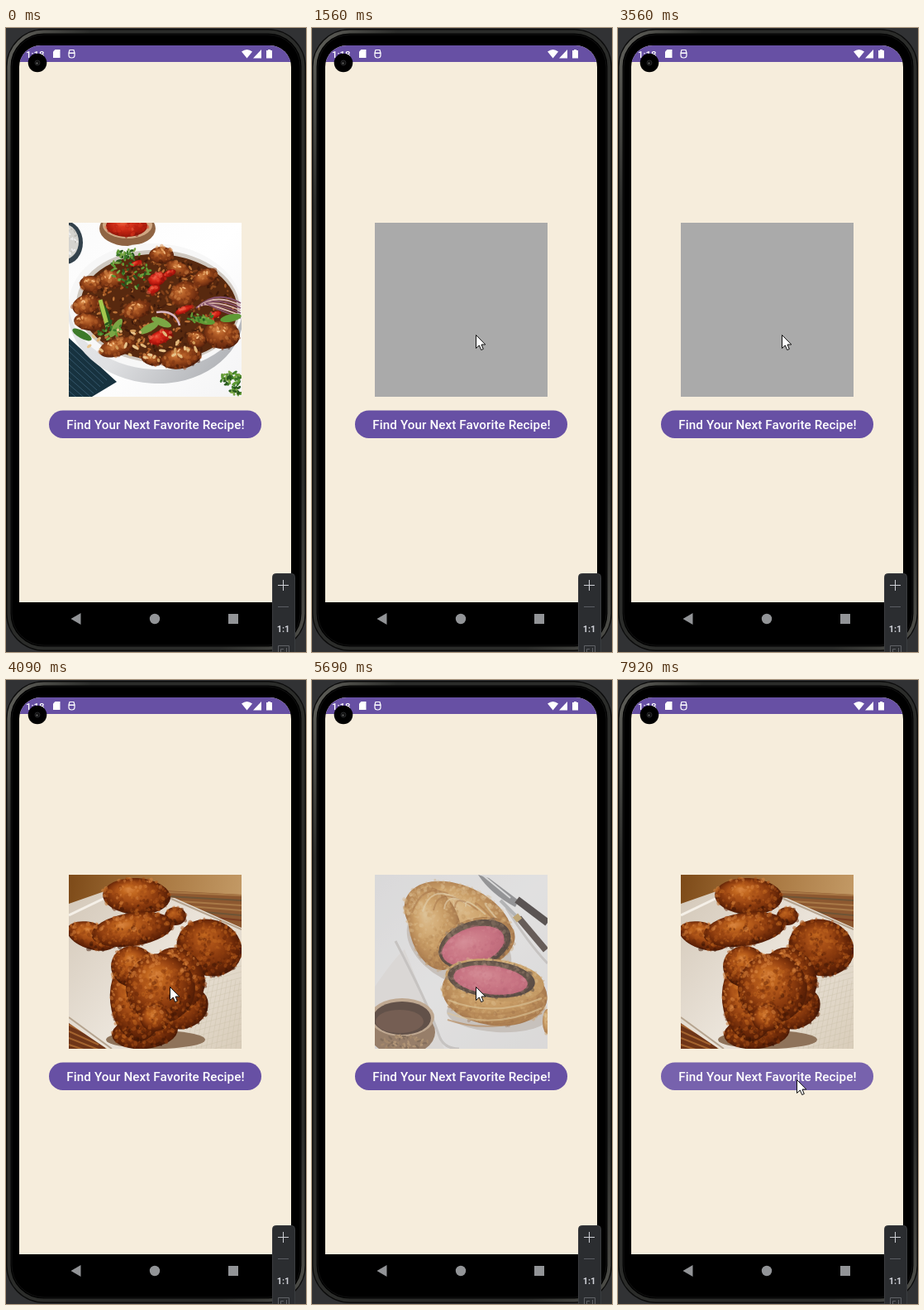
Recreate the animation shown at these times as an HTML page with a canvas. Size 363 by 753 pixels, loop 7.99 s.

```html
<!DOCTYPE html>
<html lang="en">
<head>
<meta charset="utf-8">
<title>Recipe app</title>
<style>
  html, body { margin: 0; width: 100%; height: 100%; overflow: hidden; background: #313234; }
  svg, canvas { position: absolute; left: 0; top: 0; }
  canvas { left: 76px; top: 235px; }
  text { font-family: Roboto, "Open Sans", sans-serif; fill: #fff; }
</style>
</head>
<body>
<svg width="363" height="753">
  <defs>
    <linearGradient id="rim" x2="1" y2="1">
      <stop offset="0" stop-color="#62625c"/><stop offset=".14" stop-color="#2b2c2a"/>
      <stop offset=".86" stop-color="#2b2c2a"/><stop offset="1" stop-color="#50504b"/>
    </linearGradient>
    <clipPath id="pill"><rect x="52" y="461.5" width="257" height="33.5" rx="16.75"/></clipPath>
    <clipPath id="screen"><path d="M16 693V47A26 26 0 0 1 42 21H319A26 26 0 0 1 345 47V693Z"/></clipPath>
  </defs>
  <rect x="0" y="1" width="363" height="751" rx="46" fill="#0b0b0b"/>
  <rect x="3.500" y="4.500" width="356" height="744" rx="42" fill="#000" stroke="url(#rim)" stroke-width="4"/>
  <rect x="7" y="8" width="349" height="737" rx="39" fill="#000" stroke="#111"/>
  <g clip-path="url(#screen)">
    <path d="M16 21H345V693H16Z" fill="#f6eddc"/>
    <path d="M16 21H345V41H16Z" fill="#6750a4"/>
    <text x="24" y="35.5" font-size="11.5" font-weight="500">1:18</text>
  </g>
  <g fill="#fff">
    <path d="M59.500 26H65.500V36H57V28.500Z"/>
    <path d="M285 28.500Q291.500 23.500 298 28.500L291.500 36.500Z"/>
    <path d="M299 36.500H309V26Z"/>
    <path d="M315 27H317V26H320V27H322V36.500H315Z"/>
    <path d="M77 26.500H82L83 30H76ZM76 30.500H83V33Q83 36 79.500 36T76 33Z" fill="none" stroke="#fff" stroke-width="1.2"/>
  </g>
  <circle cx="38" cy="42" r="11.3"/>
  <circle cx="38" cy="42" r="3" fill="#111" stroke="#262729"/>
  <circle cx="37.500" cy="42.500" r="1" fill="#777"/>
  <g fill="#929497">
    <path d="M78.500 713L90.500 706V720Z"/><circle cx="180" cy="713" r="6.2"/><path d="M269 707H281V719H269Z"/>
  </g>
  <g clip-path="url(#pill)">
    <path d="M52 461H309V496H52Z" fill="#6750a4"/>
    <circle id="ripple" cx="217" cy="482" fill="#fff" opacity=".1"/>
  </g>
  <text x="181" y="484" font-size="15.2" font-weight="500" letter-spacing=".1" text-anchor="middle">Find Your Next Favorite Recipe!</text>
  <rect x="322.500" y="658.500" width="27" height="100" rx="4" fill="#2b2d30" stroke="#3a3c3f"/>
  <path d="M329 672.500H342M335.500 666V679" stroke="#ced0d6"/>
  <path d="M329 698.500H342" stroke="#5a5d63"/>
  <text x="335.500" y="729" font-size="11" font-weight="700" text-anchor="middle" style="fill:#ced0d6">1:1</text>
  <path d="M329.500 754V745.500H342.500V754M332.500 754V749.500H336M339.500 748V754" fill="none" stroke="#606266"/>
</svg>
<canvas id="photo" width="209" height="210"></canvas>
<svg width="363" height="753">
  <g id="cursor">
    <circle id="tap" r="12" fill="#ddd" opacity=".5"/>
    <path d="M.5 .5V16.500L4.300 13L6.700 18.500L9.300 17.400L7 12H11.800Z" fill="#fff" stroke="#111" stroke-linejoin="round"/>
  </g>
</svg>
<script>
const $ = id => document.getElementById(id);
const LOOP = 7990, TAU = Math.PI * 2;
let g, seed = 7;

const rand = () => (seed = (seed * 16807) % 2147483647) / 2147483647;
const pick = list => list[Math.floor(rand() * list.length)];

function blob(x, y, rx, ry, color, rot = 0) {
  g.fillStyle = color;
  g.beginPath();
  g.ellipse(x, y, rx, ry, rot, 0, TAU);
  g.fill();
}

function shape(d, color, line) {
  const p = new Path2D(d);
  if (line) { g.strokeStyle = color; g.lineWidth = line; g.stroke(p); }
  else { g.fillStyle = color; g.fill(p); }
}

function blend(f, colors) {
  colors.forEach((c, i) => f.addColorStop(i / (colors.length - 1), c));
  return f;
}

const fade = (x0, y0, x1, y1, ...colors) => blend(g.createLinearGradient(x0, y0, x1, y1), colors);

// Rounded, finely textured lump lit from the upper left; colours run from light to dark.
function lump(x, y, rx, ry, rot, colors, rough = .5) {
  const glow = g.createRadialGradient(-.25, -.4, 0, 0, 0, 1.15), dots = rx * ry / 5;
  blend(glow, colors);
  g.save();
  g.translate(x, y);
  g.rotate(rot);
  g.save();
  g.scale(rx, ry);
  blob(0, 0, 1, 1, glow);
  g.restore();
  g.globalAlpha = rough;
  for (let i = 0; i < dots; i++) {
    const a = rand() * TAU, r = Math.sqrt(rand()) * 1.02, u = Math.cos(a) * r, v = Math.sin(a) * r;
    const shade = .42 + v * .25 + u * .1 + (rand() - .5) * .7;
    const c = colors[Math.max(0, Math.min(colors.length - 1, Math.floor(shade * colors.length)))];
    const s = .8 + rand() * 1.6;
    blob(u * rx, v * ry, s * 1.3, s, c, rand() * 3);
  }
  g.restore();
}

function scatter(n, x, y, rx, ry, size, colors) {
  for (let i = 0; i < n; i++) {
    const a = rand() * TAU, r = Math.sqrt(rand());
    blob(x + Math.cos(a) * r * rx, y + Math.sin(a) * r * ry, size * (.6 + rand()), size * .6, pick(colors), rand() * 3);
  }
}

function photo(draw) {
  const c = document.createElement('canvas');
  c.width = 209; c.height = 210;
  g = c.getContext('2d');
  g.translate(-76, -235);
  draw();
  return c;
}

const greens = ['#5f9a35', '#3d7a29', '#2a5a1e', '#7ba645'];

const stirFry = photo(() => {
  shape('M76 235H285V445H76Z', fade(76, 235, 285, 445, '#fbfbfb', '#fff', '#f4f4f5'));
  blob(72, 259, 21, 26, '#33424c');
  blob(71, 258, 17, 21, '#d5d4cf');
  scatter(40, 77, 258, 9, 17, 1.6, ['#eee', '#bdbcb6']);
  blob(147, 242, 34, 21, '#8f6443');
  blob(147, 238, 30, 16, '#d0a883');
  lump(146, 239, 25, 13, 0, ['#ef6a45', '#d8341c', '#b8200f', '#7f1409']);
  shape('M76 374L134 427L104 445H76Z', '#17323f');
  for (let i = 0; i < 9; i++) shape(`M76 ${382 + i * 8}L${122 - i * 4} ${425 + i * 4}`, '#34566a', 1);
  blob(181, 345, 106, 84, fade(76, 300, 240, 430, '#e9eaec', '#dfe0e2', '#b4b6ba'), .06);
  blob(181, 336, 105, 76, '#f7f7f7', .06);
  blob(184, 336, 99, 68, '#cfc8c0', .06);
  blob(185, 337, 95, 64, '#58290f', .06);
  const meat = ['#d98d4c', '#b8622a', '#96461a', '#733011', '#3c1507'];
  scatter(420, 185, 338, 90, 61, 2.2, ['#a75a25', '#4a200d', '#bd7438', '#7d3d18', '#3c190a', '#8c4a1e']);
  const pieces = [[97, 334, 17, 12], [103, 309, 14, 10], [128, 303, 17, 11], [188, 274, 15, 10], [216, 321, 18, 15],
    [261, 370, 22, 17], [212, 398, 25, 13], [135, 385, 23, 11], [100, 355, 18, 10], [241, 301, 16, 10],
    [158, 340, 17, 11], [208, 291, 16, 9], [176, 400, 13, 7], [231, 376, 12, 10]];
  for (const [x, y, rx, ry] of pieces) {
    lump(x, y, rx, ry, rand() - .5, meat);
    scatter(4, x - rx * .2, y - ry * .4, rx * .5, ry * .3, 1.6, ['#f3bd83', '#e5a263']);
  }
  for (let i = 0; i < 7; i++) shape(`M${230 + i * 2} ${338 - i}Q254 ${315 + i * 4} 284 ${332 + i * 3}`, i % 2 ? '#d8b4ae' : '#85506b', 1.800);
  shape('M182 343Q205 340 210 359', '#d9b9c6', 2.500);
  for (const [x, y, r] of [[120, 345, 1.2], [133, 362, -1], [173, 362, -.5], [188, 355, .4], [240, 353, .2], [272, 350, -.2], [92, 370, .5]])
    blob(x, y, 13, 4.500, pick(greens), r);
  shape('M114 328L123 361', '#a5c84e', 5);
  const red = ['#f1684c', '#db2c1c', '#b5170e', '#7e0d08'];
  for (const [x, y, rx, ry] of [[183, 303, 11, 8], [179, 315, 8, 5], [198, 296, 8, 4], [187, 373, 15, 8], [215, 340, 11, 4], [253, 346, 8, 4], [157, 284, 8, 3]])
    lump(x, y, rx, ry, -.4, red);
  scatter(55, 151, 292, 26, 22, 2.2, greens);
  scatter(25, 148, 272, 14, 6, 2.2, greens);
  scatter(22, 128, 366, 17, 11, 2.4, greens);
  scatter(18, 238, 350, 18, 6, 2.2, greens);
  scatter(32, 165, 380, 70, 22, 2.8, ['#e2b87c', '#d19a58', '#e8c48c']);
  scatter(50, 273, 423, 14, 8, 2.4, greens);
  scatter(20, 278, 438, 7, 6, 2.4, greens);
});

const souffle = photo(() => {
  shape('M76 235H285V445H76Z', fade(76, 235, 285, 445, '#cfd1d5', '#dfe0e2', '#e8e8e8'));
  shape('M76 235H138L128 300H76Z', fade(76, 0, 138, 0, '#e4e4e5', '#c9cbcf'));
  shape('M76 249Q110 253 134 246', '#f4f4f4', 3);
  shape('M76 303Q110 300 125 306V324L76 326Z', '#b9bcc0');
  shape('M228 235H285V322H244Z', fade(228, 0, 285, 0, '#f5f3ee', '#d6d5d2'));
  for (let i = 0; i < 7; i++) shape(`M${236 + i * 8} 235L${241 + i * 7} ${280 + i % 3 * 8}`, i % 2 ? '#fff' : '#c8cacb', 3);
  for (let i = 0; i < 12; i++) {
    g.strokeStyle = i % 2 ? '#fafafa' : '#b8b9ba'; g.lineWidth = 3;
    g.beginPath(); g.arc(82 + i % 3 * 14, 328 + i * 10, 10, i, i + 4.5); g.stroke();
  }
  blob(181, 393, 106, 48, '#a5a8ac');
  blob(181, 388, 106, 48, '#f0f0f0');
  blob(181, 386, 101, 43, '#d5d7da');
  blob(181, 391, 81, 35, '#f3f3f3');
  blob(184, 398, 70, 30, '#b9bcc0');
  shape('M247 330Q285 344 274 377Q264 395 281 410L276 445', '#d28a6a', 2);
  shape('M106 315L118 400Q124 419 180 419Q232 419 239 400L251 325Z', fade(106, 0, 251, 0, '#d0d1d3', '#eeeeed', '#e6e6e5', '#c5c8ca'));
  for (let i = 0; i < 6; i++) shape(`M${111 + i * 2} ${347 + i * 9}Q180 ${364 + i * 9} ${247 - i * 1.500} ${347 + i * 9}`, '#d3d4d5', 1);
  const crust = ['#ffe9ae', '#ffdb8b', '#f9c567', '#eda744', '#d3842c'];
  lump(187, 263, 46, 16, .05, crust, .3);
  lump(182, 312, 67, 27, 0, ['#fff0b5', '#ffe18b', '#fbcf68', '#efb249', '#dc9135'], .3);
  lump(140, 297, 41, 28, .15, crust, .3);
  lump(216, 292, 43, 28, .2, crust, .3);
  lump(208, 325, 36, 14, -.1, crust, .3);
  shape('M167 270Q171 286 183 301Q184 320 174 331', '#ffe77c', 6);
  shape('M183 291Q178 313 176 330', '#d99b3c', 2);
});

const fried = photo(() => {
  shape('M76 235H285V445H76Z', fade(76, 235, 285, 270, '#7d4a18', '#a87740', '#c39a66'));
  shape('M190 254L285 259V300L190 275Z', '#8d5830');
  for (let i = 0; i < 6; i++) shape(`M195 ${256 + i * 5}L285 ${260 + i * 6}`, pick(['#7b3d22', '#a87846', '#6e5436']), 2);
  shape('M76 410H120V445H76Z', '#6e3518');
  for (let i = 0; i < 5; i++) shape(`M76 ${416 + i * 8}L112 ${434 + i * 6}`, '#a5642f', 2);
  shape('M76 270L122 254L204 263L285 299V445H122L76 414Z', fade(76, 270, 285, 445, '#d5cabb', '#ebe4da', '#d9cdba'));
  shape('M76 407L128 445M200 264L285 301', '#b6a48f', 2);
  shape('M76 284L128 259', '#f5f0e8', 3);
  for (let i = 0; i < 14; i++) shape(`M${238 + i * 5} ${354 + i}L${218 + i * 6} 445M230 ${360 + i * 7}L285 ${345 + i * 7}`, '#c9bda966', 1);
  const crisp = ['#d98540', '#c2671f', '#aa5117', '#8b3b0e', '#652507', '#3c1404'];
  const dark = crisp.slice(1);
  blob(181, 434, 60, 11, '#8f735a');
  lump(205, 285, 13, 11, 0, dark);
  lump(158, 261, 41, 22, .05, crisp);
  lump(246, 323, 40, 34, .3, dark);
  lump(104, 309, 31, 16, .3, crisp);
  lump(153, 301, 50, 20, -.15, crisp);
  lump(168, 425, 40, 20, -.1, dark);
  lump(216, 396, 30, 24, -.5, dark);
  lump(158, 386, 32, 50, -.1, crisp);
  lump(154, 346, 27, 25, .2, crisp);
  lump(207, 360, 33, 38, -.4, crisp);
  lump(187, 372, 42, 42, .1, crisp);
  lump(180, 408, 18, 16, 0, crisp);
});

const wellington = photo(() => {
  shape('M76 235H285V445H76Z', fade(76, 235, 285, 445, '#f0eff0', '#fbfafa', '#f1efee'));
  shape('M76 370Q100 335 112 325L160 445H76Z', '#f1edea');
  shape('M101 315Q140 390 153 427Q158 445 178 445M235 275Q262 318 285 342', '#d4cfcc', 3);
  shape('M201 235L214 239L250 266L246 274Q216 258 201 235Z', '#8a8b8e');
  shape('M206 235L240 263', '#efeff0', 2);
  shape('M248 265L285 293', '#352d2b', 9);
  shape('M228 266L252 290', '#b8b9bb', 4);
  shape('M250 287L283 326', '#493a34', 8);
  shape('M246 284L251 290', '#c9a55e', 8);
  const pastry = ['#f5cf90', '#ebb468', '#d99a4a', '#bd7a32', '#925019'];
  blob(178, 321, 68, 44, '#d5ccc5', .5);
  lump(177, 291, 69, 43, .42, pastry, .35);
  lump(149, 300, 31, 51, -.25, pastry, .35);
  for (let i = 0; i < 8; i++) shape(`M${121 + i * 13} ${281 - i * 1.500}Q${133 + i * 10} ${244 + i * 3} ${165 + i * 9} ${258 + i * 5}`, i % 2 ? '#f9dfadaa' : '#aa622388', 2);
  const ring = ['#86664a', '#604632', '#49301f', '#2e1c13'];
  const pink = ['#ea8391', '#e06d7e', '#d55a70', '#c14760'];
  lump(198, 319, 49, 31, -.32, pastry, .35);
  lump(197, 319, 45, 28, -.32, ring);
  lump(195, 321, 39, 22, -.32, pink, .3);
  blob(225, 403, 62, 22, '#d5ccc5', .05);
  lump(221, 378, 64, 39, .12, pastry, .35);
  lump(221, 362, 60, 25, .12, ['#f5d08d', '#e2aa5c', '#c98a3c'], .35);
  lump(217, 361, 53, 22, .1, ring);
  lump(216, 362, 45, 17, .12, pink, .3);
  for (let i = 0; i < 4; i++) shape(`M164 ${386 + i * 8}Q220 ${408 + i * 7} 278 ${384 + i * 6}`, i % 2 ? '#b8742d99' : '#f6d49499', 2);
  blob(109, 425, 40, 28, '#8f6b4c');
  blob(109, 407, 39, 23, '#c9a886');
  blob(109, 408, 35, 20, '#41281d');
  blob(106, 412, 29, 14, '#5d3c2b');
  scatter(60, 110, 437, 30, 8, 2, ['#b58c60', '#73543a', '#a0784f']);
  lump(285, 412, 6, 15, 0, pastry);
});

// Each entry: start, picture (none = placeholder), opacity on the first of four fade steps.
const scenes = [[0, stirFry, 1], [1560], [2750, souffle, .58], [3560], [3890, fried, .25],
  [4940], [5550, wellington, .05], [6440, fried, 1]];
const taps = [[950, 1080], [3100, 3230], [4350, 4550], [5960, 6180], [7380, 7520]];
// Each entry: start, end, steps, from, to.
const moves = [[70, 810, 12, [335, 729], [198, 370]], [6710, 6980, 5, [198, 370], [213, 495]], [7180, 7320, 3, [213, 495], [216, 482]]];

const clamp = v => Math.max(0, Math.min(1, v));
const stepped = (t, a, b, n) => clamp(Math.floor((t - a) / (b - a) * (n - 1) + 1e-6) / (n - 1));
const view = $('photo').getContext('2d');

function frame(now) {
  const t = now % LOOP;

  const [start, pic, alpha] = scenes.findLast(s => t >= s[0]);
  view.globalAlpha = 1;
  view.fillStyle = '#aaa';
  view.fillRect(0, 0, 209, 210);
  if (pic) {
    view.globalAlpha = alpha + (1 - alpha) * stepped(t, start, start + 200, 4);
    view.drawImage(pic, 0, 0);
  }

  const [a, b, n, from, to] = moves.findLast(m => t >= m[0]) || moves[0];
  const k = 1 - (1 - stepped(t, a, b, n)) ** 2;
  const [x, y] = from.map((v, i) => v + (to[i] - v) * k);
  $('cursor').setAttribute('transform', `translate(${x.toFixed(1)} ${y.toFixed(1)})`);
  $('cursor').style.display = t < 70 ? 'none' : '';
  $('tap').style.display = taps.some(p => t >= p[0] && t < p[1]) ? '' : 'none';

  $('ripple').setAttribute('r', t < 7520 ? 0 : 35 + 140 * stepped(t, 7520, 7920, 6));
  requestAnimationFrame(frame);
}
requestAnimationFrame(frame);
</script>
</body>
</html>
```
